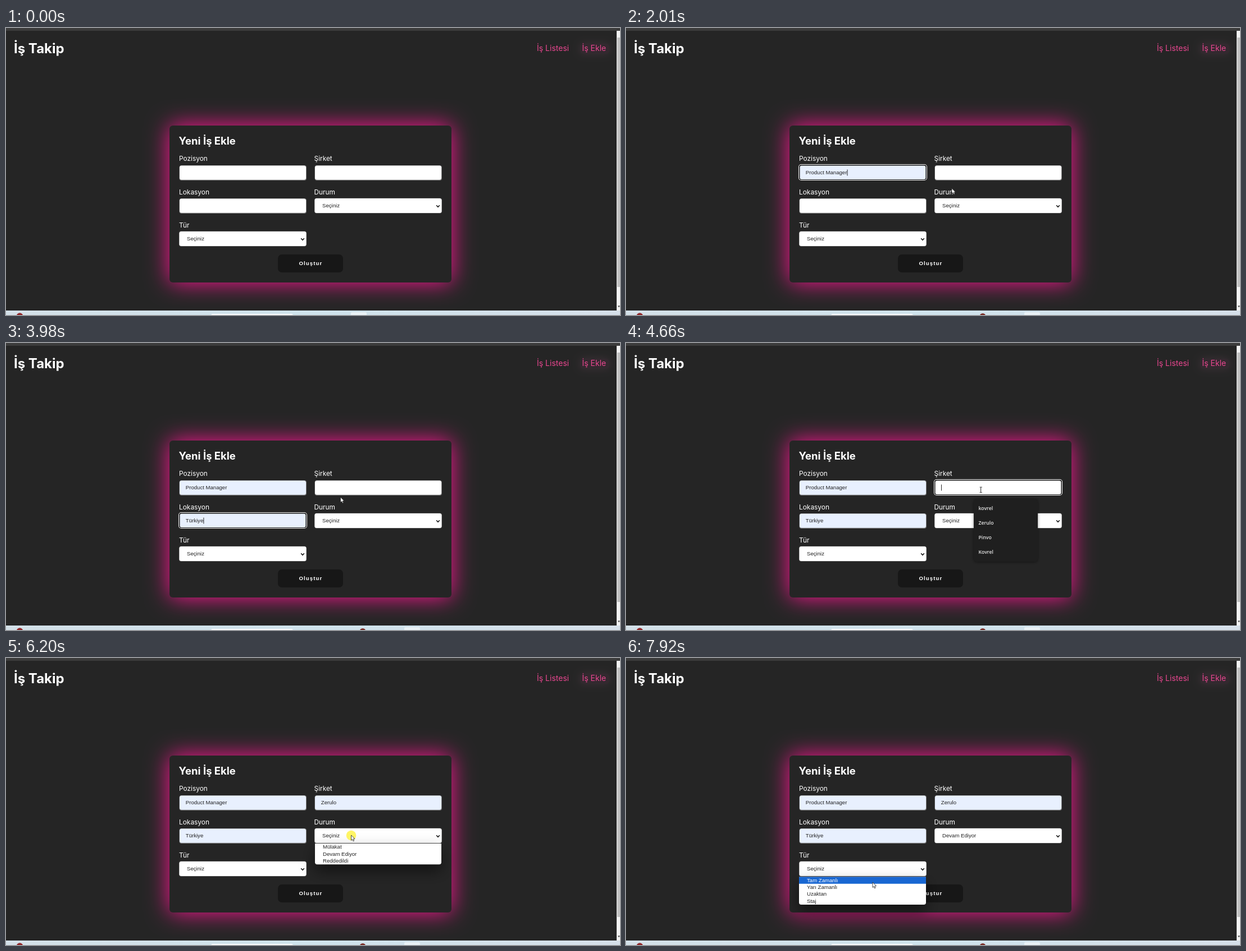
Animation, 1093 px wide and 512 px high, one loop 7.99 s. Source, as an HTML page with a canvas:

```html
<!DOCTYPE html>
<html lang="tr">
<head>
<meta charset="utf-8">
<title>İş Takip</title>
<style>
html, body { margin: 0; width: 100%; height: 100%; overflow: hidden; background: #252525; }
canvas { display: block; }
</style>
</head>
<body>
<canvas id="stage" width="1093" height="512"></canvas>
<script>
const ctx = document.getElementById('stage').getContext('2d');
const LOOP = 7990;
const UI = 'Inter, sans-serif';
const FORM = '9.6px "Liberation Sans", Arial, sans-serif';
const MENU = '600 8.7px "Open Sans", sans-serif';

const inputs = {
  position: { x: 308, y: 245 },
  location: { x: 308, y: 304 },
  company: { x: 549, y: 245 }
};
const popups = {
  position: { x: 379, y: 295, w: 129, items: ['Product Manager', 'Manager', 'Front-end Devoloper'] },
  location: { x: 379, y: 353.5, w: 112, items: ['bolu', 'Türkiye', 'werqw', 'Bolu', 'İstanbul', 'Ankara'] },
  company: { x: 619, y: 295, w: 114, items: ['kovrel', 'Zerulo', 'Pinvo', 'Kovrel'] }
};
const dropdowns = {
  status: { x: 550, y: 331, w: 225, items: ['Mülakat', 'Devam Ediyor', 'Reddedildi'] },
  type: { x: 308, y: 390.5, w: 226, items: ['Tam Zamanlı', 'Yarı Zamanlı', 'Uzaktan', 'Staj'] }
};

// Each event overrides part of the page state from its time on.
const events = [
  [0, { focus: '', popup: '', drop: '', status: 'Seçiniz', hover: -1, values: {}, busy: false, caret: 0 }],
  [940, { focus: 'position', busy: true }],
  [1010, { popup: 'position' }],
  [1400, { hover: 0, values: { position: 'Product Manager' } }],
  [1740, { popup: '', hover: -1, caret: 1 }],
  [2410, { focus: 'location', caret: 0 }],
  [2480, { popup: 'location' }],
  [2820, { hover: 0, values: { position: 'Product Manager', location: 'bolu' } }],
  [3090, { hover: 1, values: { position: 'Product Manager', location: 'Türkiye' } }],
  [3570, { popup: '', hover: -1, caret: 1 }],
  [4480, { focus: 'company', caret: 0 }],
  [4600, { popup: 'company' }],
  [4940, { hover: 0, values: { position: 'Product Manager', location: 'Türkiye', company: 'kovrel' } }],
  [5120, { hover: 1, values: { position: 'Product Manager', location: 'Türkiye', company: 'Zerulo' } }],
  [5590, { popup: '', hover: -1, caret: 1 }],
  [6130, { focus: '', drop: 'status' }],
  [6400, { hover: 0 }],
  [6500, { hover: 1 }],
  [6930, { drop: '', hover: -1, status: 'Devam Ediyor' }],
  [7590, { drop: 'type' }],
  [7790, { hover: 0 }]
];

const path = [
  [110, 865, 512], [870, 363, 260], [940, 365, 259], [1200, 365, 259], [1500, 415, 296],
  [1740, 415, 296], [2030, 582, 286], [2400, 368, 322], [2750, 368, 322], [2890, 385.5, 347],
  [3230, 401, 383], [3570, 401, 383], [3830, 593, 283], [3980, 595.5, 275], [4260, 630, 260],
  [4800, 632, 262], [4980, 637, 292], [5260, 640.5, 317], [5660, 640.5, 317], [6060, 614.5, 316],
  [6340, 614.5, 316], [6590, 620, 348], [6930, 620, 348], [7390, 446, 377], [7660, 446, 377],
  [7920, 439, 400]
];
const clicks = [[940, 1010], [1610, 1740], [2410, 2550], [3430, 3570], [4480, 4600], [5590, 5660], [6130, 6270], [6860, 6930], [7590, 7660]];

function stateAt(t) {
  const state = { since: 0 };
  for (const [time, change] of events) {
    if (time > t) break;
    Object.assign(state, change, { since: time });
  }
  return state;
}

function cursorAt(t) {
  if (t < path[0][0]) return null;
  const i = path.findIndex(p => p[0] > t);
  if (i < 0) return path[path.length - 1].slice(1);
  const [t0, x0, y0] = path[i - 1], [t1, x1, y1] = path[i];
  const k = (t - t0) / (t1 - t0), e = k * k * (3 - 2 * k);
  return [x0 + (x1 - x0) * e, y0 + (y1 - y0) * e];
}

function box(x, y, w, h, r, fill) {
  ctx.fillStyle = fill;
  ctx.beginPath();
  ctx.roundRect(x, y, w, h, r);
  ctx.fill();
}

function shadowed(color, blur, dy, draw) {
  ctx.save();
  ctx.shadowColor = color;
  ctx.shadowBlur = blur;
  ctx.shadowOffsetY = dy;
  draw();
  ctx.restore();
}

function text(str, x, y, font, fill) {
  ctx.font = font;
  ctx.fillStyle = fill;
  ctx.fillText(str, x, y);
}

function disc(x, y, r, fill) {
  ctx.fillStyle = fill;
  ctx.beginPath();
  ctx.arc(x, y, r, 0, Math.PI * 2);
  ctx.fill();
}

function line(points, color, width) {
  ctx.strokeStyle = color;
  ctx.lineWidth = width;
  ctx.beginPath();
  points.forEach(([x, y], i) => i ? ctx.lineTo(x, y) : ctx.moveTo(x, y));
  ctx.stroke();
}

function drawPage(busy) {
  box(0, 0, 1093, 512, 0, '#252525');
  box(0, 0, 1093, 5, 0, '#3c3c3c');
  text('İş Takip', 14, 45, `700 24px ${UI}`, '#fff');
  text('İş Listesi', 945, 41, `14px ${UI}`, '#e8468f');
  shadowed('#3b3036', 14, 0, () => box(1022, 28, 52, 18, 6, '#33292f'));
  text('İş Ekle', 1025.5, 41, `14px ${UI}`, '#e8468f');

  shadowed('#ff1493', 40, 0, () => box(291, 174, 502, 280, 6, '#252525'));
  text('Yeni İş Ekle', 307.5, 208, `700 18.5px ${UI}`, '#fff');
  const labels = [['Pozisyon', 308, 237], ['Şirket', 548.5, 237], ['Lokasyon', 308, 297], ['Durum', 548.5, 297], ['Tür', 308, 356]];
  for (const [str, x, y] of labels) text(str, x, y, `11.9px ${UI}`, '#fff');

  box(484, 404, 116, 32, 7, '#171717');
  ctx.letterSpacing = '1.1px';
  text('Oluştur', 521.5, 422.5, '700 9.6px "Liberation Sans", Arial, sans-serif', '#fff');
  ctx.letterSpacing = '0px';

  box(1087, 5, 6, 499, 0, '#f4f4f4');
  box(1088, 17, 5, 445, 0, '#c1c1c1');
  ctx.fillStyle = '#444';
  ctx.beginPath();
  ctx.moveTo(1089, 495.5);
  ctx.lineTo(1093, 495.5);
  ctx.lineTo(1091, 498.5);
  ctx.fill();

  const bar = ctx.createLinearGradient(0, 0, 1093, 0);
  bar.addColorStop(0, '#d3e0e8');
  bar.addColorStop(0.5, '#cfe3ec');
  bar.addColorStop(1, '#d6e0ea');
  box(0, 504, 1093, 8, 0, bar);
  box(365, 510, 146, 6, 3, '#fafcfd');
  box(busy ? 709 : 614, 507, 28, 8, 2, '#eaf2f6');
  disc(24.5, 514, 5.8, '#92292b');
  if (busy) disc(635, 514.5, 5.5, '#7c3029');
}

function drawInput(name, state, t) {
  const { x, y } = inputs[name], value = state.values[name] || '';
  if (state.focus === name) {
    box(x - 1, y - 2, 229, 29, 5, '#fff');
    box(x, y - 1, 227, 27, 4, '#101010');
    box(x + 1.5, y + 0.5, 224, 24.5, 3, value ? '#e8f0fe' : '#fff');
  } else {
    box(x + 0.5, y, 226.5, 27, 4, '#767676');
    box(x + 1, y + 0.5, 225, 25.3, 3.5, value ? '#e8f0fe' : '#fff');
  }
  text(value, x + 11.8, y + 16, FORM, '#222');
  if (state.focus === name && (t - state.since) % 1000 < 500) {
    const cx = x + 12 + (state.caret ? ctx.measureText(value).width : 0);
    box(cx, y + 7.5, 0.9, 11, 0, '#111');
  }
}

function drawSelect(x, y, value) {
  box(x, y - 0.5, 227, 27, 4, '#767676');
  box(x + 0.5, y, 226, 26, 3.5, '#fff');
  text(value, x + 14, y + 16, FORM, '#222');
  const cx = x + 220, cy = y + 14;
  line([[cx - 2.8, cy - 1.7], [cx, cy + 1.3], [cx + 2.8, cy - 1.7]], '#111', 1.5);
}

function drawPopup({ x, y, w, items }, hover) {
  const h = items.length * 26 + 8;
  shadowed('rgba(0,0,0,.45)', 5, 1, () => box(x, y - 17, w, h, 5, '#1f1f1f'));
  items.forEach((item, i) => {
    const cy = y + i * 25.9;
    if (i === hover) {
      box(x + 3, cy - 12.8, w - 6, 25.4, 4, '#373737');
      const cx = x + w - 16;
      line([[cx - 3, cy - 3], [cx + 3, cy + 3]], '#ddd', 1);
      line([[cx + 3, cy - 3], [cx - 3, cy + 3]], '#ddd', 1);
    }
    text(item, x + 8.5, cy + 3, MENU, '#e8e8e8');
  });
}

function drawDropdown({ x, y, w, items }, hover) {
  const row = 12.3, h = items.length * row + 0.4;
  shadowed('rgba(0,0,0,.5)', 26, 12, () => box(x, y, w, h, [0, 0, 4, 4], '#fff'));
  items.forEach((item, i) => {
    if (i === hover) box(x, y + i * row, w, row, 0, '#1967d2');
    text(item, x + 14, y + i * row + 9.3, FORM, i === hover ? '#fff' : '#222');
  });
}

function drawCursor(x, y, t) {
  if (clicks.some(([from, to]) => t >= from && t < to)) disc(x, y + 0.5, 8.8, 'rgba(255,241,50,.75)');
  const overInput = Object.values(inputs).some(f => x > f.x && x < f.x + 227 && y > f.y && y < f.y + 27);
  if (overInput) {
    line([[x, y - 4], [x, y + 4.5]], '#222', 1);
    for (const dy of [-4.5, 5]) line([[x - 2, y + dy], [x + 2.2, y + dy]], '#222', 0.9);
    return;
  }
  const tip = [[0, 0], [0, 9.4], [2.1, 7.5], [3.6, 10.8], [5.1, 10.1], [3.7, 6.9], [6.5, 6.7]];
  ctx.beginPath();
  for (const [dx, dy] of tip) ctx.lineTo(x + dx, y + dy);
  ctx.closePath();
  ctx.fillStyle = '#fff';
  ctx.fill();
  ctx.strokeStyle = '#222';
  ctx.lineWidth = 0.8;
  ctx.stroke();
}

function render(t) {
  const state = stateAt(t), cursor = cursorAt(t);
  drawPage(state.busy);
  for (const name in inputs) drawInput(name, state, t);
  drawSelect(549, 304, state.status);
  drawSelect(308, 363, 'Seçiniz');
  if (state.popup) drawPopup(popups[state.popup], state.hover);
  if (state.drop) drawDropdown(dropdowns[state.drop], state.hover);
  if (cursor) drawCursor(...cursor, t);
}

const start = performance.now();
function tick() {
  render((performance.now() - start) % LOOP);
  requestAnimationFrame(tick);
}
tick();
</script>
</body>
</html>
```
